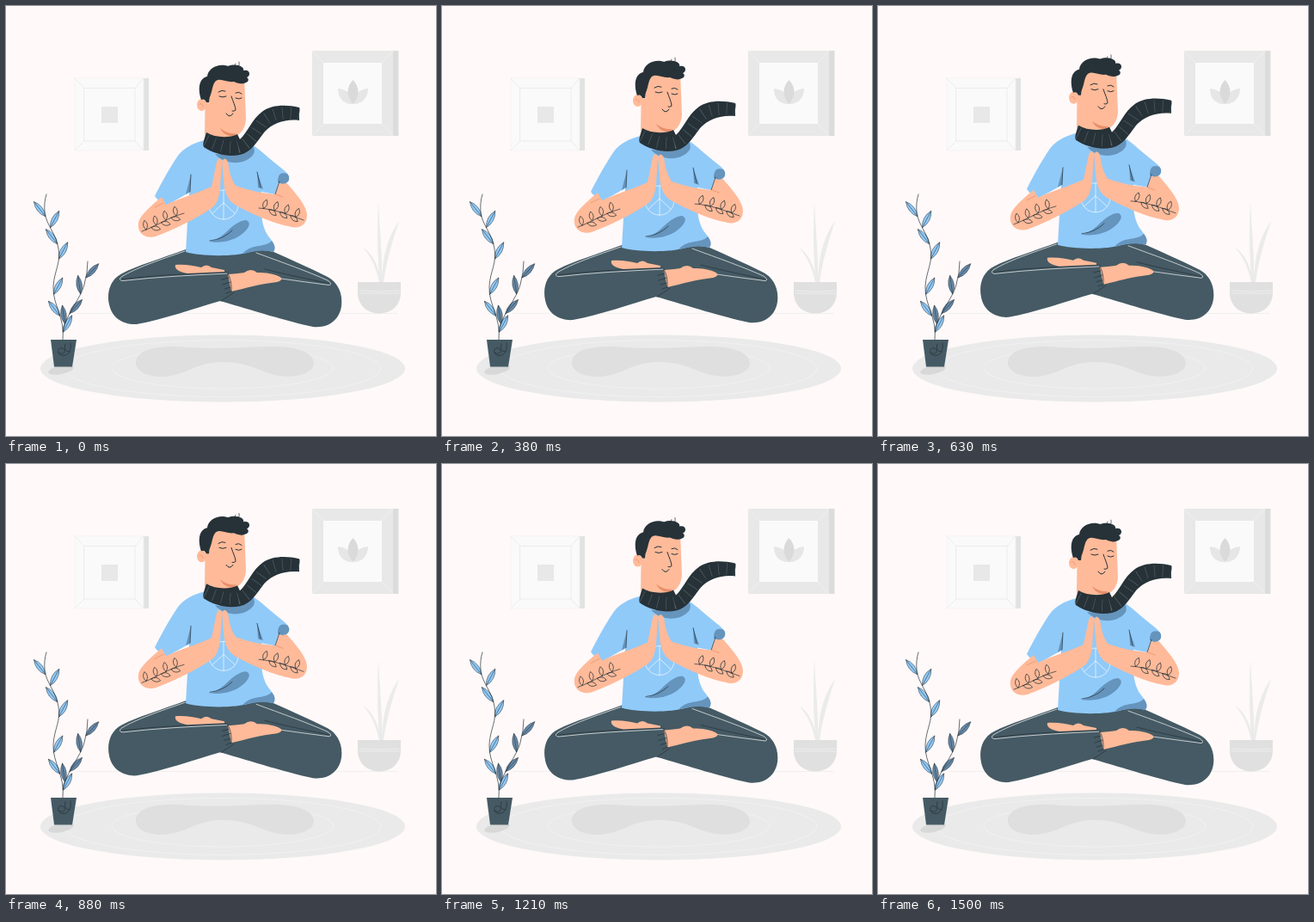
Recreate the animation shown at these times as an HTML page. Size 500 px wide and 500 px high, loop 1540 ms.

```html
<!DOCTYPE html>
<html lang="en">
<head>
<meta charset="utf-8">
<title>Floating meditation</title>
<style>
html, body { margin: 0; width: 100%; height: 100%; overflow: hidden; background: #fff9f9; }
svg { display: block; width: 100vw; height: 100vh; }
.line { fill: none; stroke-width: .7; stroke-linecap: round; stroke-linejoin: round; }
.dark { stroke: #263238; }
.pale { stroke: #fafafa; }
.skin { fill: #ffba99; }
.crease { stroke: #e58e6c; }
.navy { fill: #263238; }
.shirt { fill: #90caf9; }
.shade { fill: #6594bd; }
</style>
</head>
<body>
<svg viewBox="0 0 500 500">
  <path class="line" stroke="#ebebeb" d="M82 357.500H455"/>

  <g id="square-picture">
    <path fill="#e2e2e2" d="M160 84H166V168H160Z"/>
    <path fill="#fafafa" stroke="#f0f0f0" stroke-width=".6" d="M80 84H160V168H80Z"/>
    <path class="line" stroke="#e6e6e6" d="M91 95.500H150V157H91ZM80 84L91 95.500M160 84L150 95.500M80 168L91 157M160 168L150 157"/>
    <path fill="#e8e8e8" d="M111 117H130V136H111Z"/>
  </g>

  <g id="lotus-picture">
    <path fill="#dcdcdc" d="M450 52H456.500V151H450Z"/>
    <path fill="#e8e8e8" d="M356 52H450V151H356Z"/>
    <path class="line" stroke="#f3f3f3" d="M356 52L369 66M450 52L437 66M356 151L369 137M450 151L437 137"/>
    <path fill="#fafafa" d="M369 66H437V137H369Z"/>
    <path fill="#e6e6e6" d="M403 114C391 114 386 106 386 96C397 97 403 103 403 114ZM404 114C415 114 421 106 421 96C410 97 404 103 404 114Z"/>
    <path fill="#dadada" d="M403.500 114C395 104 396 94 403.500 86C411 94 412 104 403.500 114Z"/>
  </g>

  <g id="rug">
    <ellipse cx="252" cy="421.500" rx="212" ry="39" fill="#eaeaea"/>
    <g class="line" stroke="#f4f4f4">
      <ellipse cx="252" cy="421.500" rx="184" ry="33"/>
      <ellipse cx="252" cy="421" rx="129" ry="24"/>
    </g>
    <path fill="#dfdfdf" d="M151 415C151 401 170 395 200 396C235 399 270 397 305 396C340 395 358 404 358 415C358 427 337 433 318 430C297 427 285 414 252 414C219 414 211 430 181 431C163 431 151 424 151 415Z"/>
  </g>

  <g id="gray-plant">
    <path fill="#ebebeb" d="M435 321C431 290 432 255 433 227C434 255 438 290 437 321ZM434 321C430 302 424 291 415 281C426 287 434 304 436 321ZM437 321C438 289 444 269 457 250C449 275 443 294 439 321Z"/>
    <path fill="#e0e0e0" d="M409 321H459V333C459 348 448 357.500 434 357.500C420 357.500 409 348 409 333Z"/>
    <path class="line" stroke="#f3f3f3" d="M411 331Q434 333 458 331M411 334H458"/>
  </g>

  <g id="blue-plant">
    <ellipse cx="64" cy="423" rx="15" ry="5" fill="#d8d8d8" transform="rotate(-12 64 423)"/>
    <g id="leaves" class="dark" stroke-width=".5"></g>
    <path id="stem" class="line dark" d="M66 388C69 362 54 348 55 326C56 308 64 299 61 282C58 264 47 255 45 240Q44 228 47 219"/>
    <path id="branch" class="line dark" d="M66 378C72 354 86 342 91 324Q95 310 95 297"/>
    <path fill="#455a64" d="M52 388H82L77 419.500H56Z"/>
    <path class="line dark" d="M75 392C77 404 69 408 64 406C58 403 61 396 66 398C71 401 67 407 61 403M69 393Q66 402 74 402"/>
  </g>

  <g id="figure">
    <path fill="#455a64" d="M209 283C182 293 152 302 135 311C121 318 117 333 120 347C123 363 137 371 152 370C182 365 220 351 249 343C287 354 328 367 357 373C376 375 388 364 390 349C392 333 385 321 374 315C350 303 323 291 302 282Z"/>
    <path class="line dark" d="M258 310C215 311 172 313 134 318M301 306C328 313 355 318 376 323M250 343Q258 338 265 333"/>
    <path class="line pale" d="M208 285C179 295 150 305 134 315Q130 319 136 319.500C175 315 215 313 257 311M291 287C321 298 352 309 374 319Q380 323 376 324.500Q348 321 320 317"/>
    <path class="skin" d="M197 301C208 300 218 302 227 304Q233 299 239 304L254 307V309L211 311Q195 308 197 301Z"/>
    <path class="skin" d="M258 312Q271 311 277 310Q285 304 292 310C302 310 313 311 320 316Q322 319 315 321C296 323 279 328 262 332Z"/>
    <path class="line dark" d="M258 311Q263 320 262 332M251 318L259 316M252 324L261 321M254 329L261 327M256 334L262 332"/>

    <path class="skin" d="M320 199C332 212 350 231 350 243C350 254 342 259 332 257L300 240L314 216Z"/>
    <path class="shirt" d="M231 156C216 160 207 165 200 174C189 190 180 207 173 221Q177 227 186 232L213 217L209 286C225 291 265 292 284 286Q298 282 311 286Q315 280 307 270C300 262 298 252 297 242L297 216L313 219L318 204Q324 209 328 204C331 199 328 195 322 190C310 181 300 171 289 163L270 156Z"/>
    <path class="shade" d="M316 205C316 194 321 193 327 195Q331 199 328 204Q323 209 316 205ZM275 288C287 275 301 282 309 273Q315 280 311 286Q298 282 275 288ZM236 274C254 272 261 251 279 249Q287 252 278 262C266 274 249 276 236 274ZM243 172C260 174 275 172 287 163Q290 167 288 172C280 185 255 186 243 172Z"/>
    <path class="shade" d="M215 196L209 219L214 216ZM292 193L293 211L299 213Z"/>
    <path class="line dark" d="M215 196L214 216M292 193L296 211M237 273Q253 271 263 261M318 204L313 219"/>
    <g class="line pale">
      <circle cx="253" cy="231" r="17"/>
      <path d="M253 214V248M253 229L240 241M253 229L266 241"/>
    </g>

    <path class="skin" d="M181 222C168 233 156 243 154 252C152 265 163 271 174 268C193 261 224 246 239 235Q247 230 249 212L251 180Q248 174 245 181L239 210C222 218 203 223 186 231Z"/>
    <path class="skin" d="M251 181Q254 174 258 181Q260 199 267 209C284 215 300 218 314 219L346 240Q352 257 333 257C310 253 284 241 266 231Q257 226 254 212Z"/>
    <path class="line crease" d="M183 229L173 234M314 219L322 222"/>
    <g class="line dark">
      <g id="tattoos"></g>
      <path id="left-vine" d="M158 262C175 256 188 246 207 241"/>
      <path id="right-vine" d="M294 235C311 236 327 242 346 249"/>
    </g>

    <ellipse class="skin" cx="227.500" cy="115" rx="5.500" ry="7"/>
    <path class="skin" d="M232 82H277L279 132C278 143 273 148 268 151L263 165H238L231 150Z"/>
    <path fill="#e78f69" d="M249 142Q257 149 267 148Q267 152 260 151Q252 149 249 142Z"/>
    <path class="navy" d="M227 109C223 97 224 84 234 82C235 71 249 66 258 70C268 66 278 71 276 75C284 73 285 81 280 83Q283 85 281 88C275 92 269 90 265 88C256 89 250 83 244 87C240 91 240 98 238 103Q236 107 236 112H233Q231 107 227 109Z"/>
    <path class="line dark" d="M257 70Q266 74 267 67M263 71Q273 73 271 65"/>
    <g class="line dark" style="stroke-width:1">
      <path d="M247 100Q251 97 255 99M267 101Q271 99 274 102M248 105Q252 107 256 105M267 107Q271 109 274 107"/>
      <path d="M262 105C264 111 267 117 267 121Q265 123 263 122M256 125Q260 131 264 125"/>
    </g>
    <path class="line crease" d="M225 114Q228 112 229 117"/>

    <path class="navy" d="M233 147C231 154 228 160 230 164C242 172 258 176 272 173C286 170 292 157 301 146C310 136 326 131 341 133V118C325 114 309 115 299 122C286 131 281 147 272 155L269 149C259 154 243 153 233 147Z"/>
    <path fill="none" stroke="#55646b" stroke-width="14" stroke-dasharray=".6 9" d="M233 156C245 162 258 166 270 164C284 160 291 145 299 134C310 124 325 123 341 125.500"/>
  </g>
</svg>

<script>
const byId = id => document.getElementById(id);

// A leaf growing from (x, y); angle is measured clockwise from straight up.
function leaf(x, y, angle, length, width, veined) {
  const vein = veined ? `M0 0V${-length}` : '';
  return `<path transform="translate(${x} ${y}) rotate(${angle})"
    d="M0 0Q${width} ${-length / 2} 0 ${-length}Q${-width} ${-length / 2} 0 0${vein}"/>`;
}

// Negative positions put the leaf on the left of the stem.
function growLeaves(stemId, positions, { lean, spread, length, width, veined }) {
  const stem = byId(stemId);
  return positions.map(position => {
    const { x, y } = stem.getPointAtLength(Math.abs(position) * stem.getTotalLength());
    return leaf(x, y, lean + Math.sign(position) * spread, length, width, veined);
  }).join('');
}

const plantLeaf = { length: 22, width: 6.5, veined: true };
const stemLeaves = growLeaves('stem', [.05, -.16, .31, .55, -.65, .77, -.85],
  { ...plantLeaf, lean: -5, spread: 33 });
const branchLeaves = growLeaves('branch', [-.1, .25, -.55, .78],
  { ...plantLeaf, lean: 17, spread: 25 });
byId('leaves').innerHTML = `<g fill="#90caf9">${stemLeaves}</g><g fill="#6488a8">${branchLeaves}</g>`;

const alternating = Array.from({ length: 7 }, (_, i) => (i % 2 ? 1 : -1) * (.1 + i * .12));
const vineLeaf = { spread: 55, length: 11, width: 5 };
byId('tattoos').innerHTML =
  growLeaves('left-vine', alternating, { ...vineLeaf, lean: 45 }) +
  growLeaves('right-vine', alternating, { ...vineLeaf, lean: 75 });

const LOOP = 1540;
const figure = byId('figure');

function animate() {
  const phase = (performance.now() % LOOP + 45) / LOOP;
  const lift = -4.2 + 4.3 * Math.cos(2 * Math.PI * phase);
  figure.setAttribute('transform', `translate(0 ${lift.toFixed(2)})`);
  requestAnimationFrame(animate);
}
animate();
</script>
</body>
</html>
```
